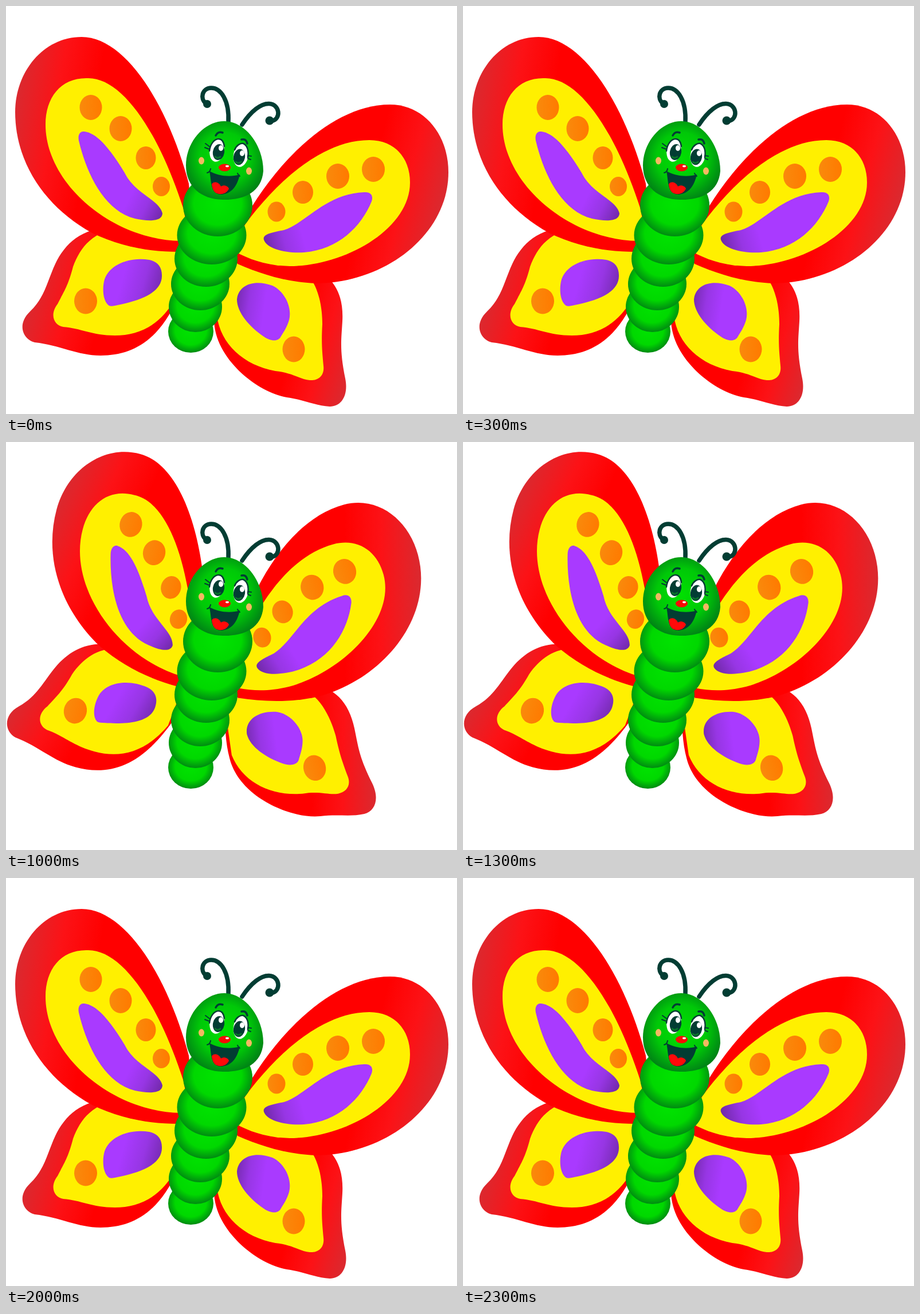
An HTML page for the animation above (2500 ms loop, 787 px wide and 712 px high).

```html
<!DOCTYPE html>
<html lang="en">
<head>
<meta charset="utf-8">
<title>Butterfly</title>
<style>
  html, body { margin: 0; height: 100%; overflow: hidden; background: #fff; }
  svg { display: block; width: 100%; height: 100%; }
  .yellow { fill: #fff000; }
  .dots { fill: url(#orange); }
  .line { fill: none; stroke: #023d33; stroke-linecap: round; }
  .dark { fill: #023d33; }
</style>
</head>
<body>
<svg viewBox="0 0 787 712">
  <defs id="defs">
    <linearGradient id="orange">
      <stop stop-color="#f98a0c"/><stop offset="1" stop-color="#ff7a00"/>
    </linearGradient>
    <radialGradient id="segment" cy=".47" r=".53">
      <stop stop-color="#00e400"/><stop offset=".65" stop-color="#00d800"/><stop offset="1" stop-color="#008a12"/>
    </radialGradient>
    <radialGradient id="skin" cy=".47" r=".56">
      <stop stop-color="#00e000"/><stop offset=".58" stop-color="#00c808"/><stop offset="1" stop-color="#008016"/>
    </radialGradient>
  </defs>
  <g id="butterfly">
    <g id="lowerLeft">
      <path fill="url(#redLL)" d="M205 388C140 380 105 410 86 450C72 480 68 508 42 533C18 556 30 582 50 587C95 592 125 610 165 610C225 610 275 580 308 488L310 420Z"/>
      <path class="yellow" d="M205 386C152 392 130 420 117 455C108 490 100 500 90 520C76 538 83 557 100 560C130 562 150 575 190 575C235 575 275 555 302 498L310 420Z"/>
      <path fill="url(#purpleLL)" d="M180 523C168 515 168 490 172 477C180 452 215 437 250 443C264 446 272 455 272 470C273 505 220 517 190 523C185 524 182 524 180 523Z"/>
      <g class="dots"><ellipse cx="139" cy="515" rx="20" ry="22.5"/></g>
    </g>
    <g id="lowerRight">
      <path fill="url(#redLR)" d="M500 453C565 455 590 495 587 550C585 585 582 600 592 650C598 680 585 699 565 699C540 698 520 687 490 683C440 675 362 615 363 545C363 525 366 505 372 480L385 445Z"/>
      <path class="yellow" d="M505 454C545 470 552 525 552 555C550 590 552 605 554 628C556 645 545 654 530 653C515 652 500 640 470 637C415 627 374 590 368 540L374 490L385 445Z"/>
      <path fill="url(#purpleLR)" d="M403 512C406 485 435 477 465 488C485 497 500 525 494 548C490 562 483 571 479 578C473 587 460 584 450 577C425 560 403 535 403 512Z"/>
      <g class="dots"><ellipse cx="502" cy="599" rx="19.5" ry="22.5"/></g>
    </g>
    <g id="upperLeft">
      <path fill="url(#redUL)" d="M132 54C207 54 281 168 319 310L330 429H301C250 429 200 420 150 396C70 352 16 275 16 185C16 115 65 54 132 54Z"/>
      <path class="yellow" d="M140 126C200 122 265 215 310 355L320 410H305C185 408 69 310 69 207C69 160 95 126 140 126Z"/>
      <path fill="url(#purpleUL)" d="M135 219C160 220 185 255 207 291C225 328 268 338 273 362C272 378 245 375 225 371C170 357 140 290 127 235C125 225 129 219 135 219Z"/>
      <g class="dots">
        <ellipse cx="148" cy="177" rx="19.5" ry="22"/><ellipse cx="200" cy="214" rx="19.5" ry="22"/>
        <ellipse cx="244" cy="265" rx="17.5" ry="20"/><ellipse cx="271" cy="315" rx="15" ry="17"/>
      </g>
    </g>
    <g id="upperRight">
      <path fill="url(#redUR)" d="M420 365C480 262 575 172 670 172C730 172 772 225 772 290C772 400 660 484 540 484C490 482 445 468 404 450L390 430Z"/>
      <path class="yellow" d="M418 380C470 310 550 234 634 234C678 234 705 265 705 308C705 390 590 454 495 454C460 453 435 446 408 433L395 425Z"/>
      <path fill="url(#purpleUR)" d="M450 408C447 398 465 395 485 391C525 378 557 328 625 325C638 324 641 332 638 341C620 385 580 425 520 430C490 432 455 424 450 408Z"/>
      <g class="dots">
        <ellipse cx="641" cy="285" rx="20" ry="22"/><ellipse cx="579" cy="297" rx="20" ry="22"/>
        <ellipse cx="518" cy="325" rx="18" ry="20"/><ellipse cx="472" cy="359" rx="15.5" ry="17.5"/>
      </g>
    </g>

    <g fill="url(#segment)">
      <ellipse cx="322.5" cy="568" rx="39.5" ry="37"/>
      <ellipse cx="330.5" cy="525" rx="46.5" ry="44"/>
      <ellipse cx="339" cy="485" rx="51" ry="46"/>
      <ellipse cx="349" cy="441" rx="55" ry="49"/>
      <ellipse cx="359" cy="400" rx="60.5" ry="51"/>
      <ellipse cx="369.5" cy="348" rx="60.5" ry="54"/>
    </g>
    <g class="line" stroke-width="7.5">
      <path d="M388 203C390 165 375 143 358 143C342 143 338 162 349 170"/>
      <path d="M412 207C428 183 445 170 459 170.5C478 171 481 198 463 201"/>
    </g>
    <circle class="dark" cx="351" cy="171" r="7"/>
    <circle class="dark" cx="460" cy="200" r="7.5"/>
    <path fill="url(#skin)" d="M382 201C418 202 449 243 449 288C446 325 415 339 378 338C340 337 314 315 314 278C314 238 346 200 382 201Z"/>

    <path class="line" stroke-width="3.5" d="M366 226Q370 218 378 221M411 233Q419 231 421 240"/>
    <g id="open">
      <g fill="#fff">
        <ellipse cx="368" cy="252" rx="12.5" ry="20" transform="rotate(10 368 252)"/>
        <ellipse cx="410" cy="260" rx="13" ry="21" transform="rotate(10 410 260)"/>
      </g>
      <g class="dark">
        <ellipse cx="371" cy="255" rx="10" ry="14" transform="rotate(10 371 255)"/>
        <ellipse cx="407" cy="263.5" rx="10" ry="14" transform="rotate(10 407 263.5)"/>
      </g>
      <path fill="none" stroke="#08702c" stroke-width="3" stroke-linecap="round" d="M365 263Q369 267 374 263M401 272Q405 276 410 272"/>
      <g fill="#fff"><ellipse cx="375" cy="248" rx="4" ry="5"/><ellipse cx="412" cy="257" rx="4" ry="5"/></g>
      <path class="line" stroke-width="2.5" d="M355 253C356 242 363 232 371 232C377 232 380 238 381 245M399 251C402 243 409 239 414 240C421 243 424 252 422 264"/>
      <path class="line" stroke-width="2" d="M356 246L348 240M355 250L347 247M422 261L428 262M422 266L427 268"/>
    </g>
    <g id="closed" class="line" stroke-width="2.5">
      <path d="M355 248C352 260 356 272 363 271C368 271 371 268 372 264M396 270C399 278 409 281 414 275C418 270 420 265 419 260"/>
      <path stroke-width="2" d="M355 248L348 245M354 253L349 252M419 262L427 261M418 266L426 268"/>
    </g>
    <g fill="#f5b862"><ellipse cx="341" cy="270" rx="5" ry="6.5"/><ellipse cx="424" cy="288" rx="5" ry="6.5"/></g>
    <ellipse cx="381.5" cy="282" rx="10.5" ry="6.5" fill="#fa0a05"/>
    <ellipse cx="386" cy="279.5" rx="3" ry="1.8" fill="#fff"/>
    <path class="dark" d="M355 288C370 297 392 299 408 294C404 312 395 328 375 329C356 328 359 308 355 288Z"/>
    <path fill="#ff0a0a" d="M359 311C362 305 372 307 375 315C380 311 388 314 389 319C385 327 377 329 372 328C362 327 360 318 359 311Z"/>
    <path class="line" stroke-width="2" d="M351 291Q356 290 357 284M404 292Q406 296 408 297"/>
  </g>
</svg>
<script>
const el = id => document.getElementById(id);

function gradient(id, [x1, y1, x2, y2], ...colors) {
  const stops = colors.map((color, i) =>
    `<stop offset="${i / (colors.length - 1)}" stop-color="${color}"/>`).join('');
  el('defs').insertAdjacentHTML('beforeend',
    `<linearGradient id="${id}" gradientUnits="userSpaceOnUse" x1="${x1}" y1="${y1}" x2="${x2}" y2="${y2}">${stops}</linearGradient>`);
}
const red = (id, line) => gradient('red' + id, line, '#dc282e', '#fc1216', '#ff0000');
const purple = (id, line) => gradient('purple' + id, line, '#7029a8', '#9736e4', '#a93aff');

red('UL', [18, 180, 150, 203]);
red('UR', [770, 300, 645, 267]);
red('LL', [35, 545, 155, 578]);
red('LR', [595, 655, 490, 625]);
purple('UL', [274, 365, 215, 335]);
purple('UR', [450, 408, 515, 390]);
purple('LL', [277, 490, 205, 470]);
purple('LR', [395, 525, 450, 533]);

// Wing hinges: swing in degrees when raised, then the pivot
const upper = { upperLeft: [15, 308.5, 426], upperRight: [-15, 391.5, 445.2] };
const lower = { lowerLeft: [15, 304.5, 423.5], lowerRight: [-15, 405.5, 445] };

function swing(wings, raised) {
  for (const [id, [angle, x, y]] of Object.entries(wings))
    el(id).setAttribute('transform', `rotate(${raised ? angle : 0} ${x} ${y})`);
}

function draw() {
  const step = Math.floor(performance.now() % 2500 / 500);
  const blink = step % 2 === 1;
  swing(upper, step > 0 && step < 4);
  swing(lower, step === 2);
  el('open').style.display = blink ? 'none' : '';
  el('closed').style.display = blink ? '' : 'none';
  el('butterfly').setAttribute('transform', step === 3 ? 'translate(.7 1)' : '');
  requestAnimationFrame(draw);
}
draw();
</script>
</body>
</html>
```
